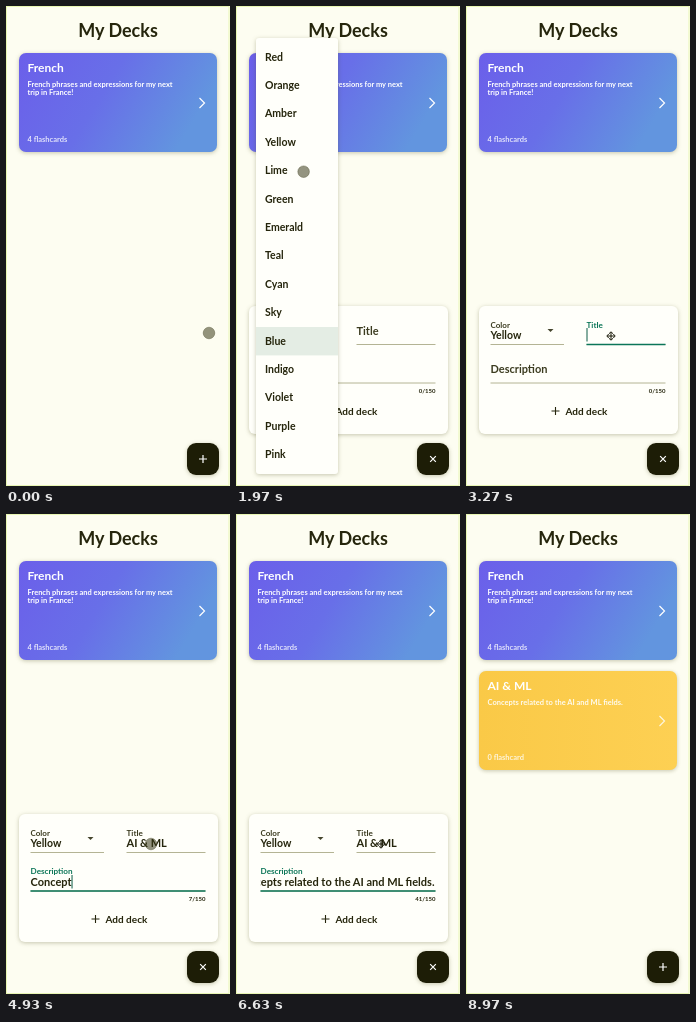
Write an HTML page that moves like this. It is 224x480 px and loops after 9010 ms.

```html
<!DOCTYPE html>
<html lang="en">
<head>
<meta charset="utf-8">
<title>My Decks</title>
<style>
  html, body { margin: 0; width: 100%; height: 100%; overflow: hidden; background: #fdfdf1; }
  svg { display: block; width: 224px; height: 480px; }
  text { font: 700 11px Lato, "Open Sans", sans-serif; fill: #25250c; white-space: pre; }
  .heading { font-size: 18px; }
  .name { font-size: 12px; }
  .card text { fill: #fff; }
  .card .small { font-size: 7.5px; }
  .label { fill: #3c3c20; }
  .tiny { font-size: 6px; }
  .option { font-size: 10.5px; }
  .line { stroke: #b4b494; stroke-width: 1; }
  .thin { fill: none; stroke: #25250c; stroke-width: 1.1; }
  .green { fill: #0c7658; }
  .focus { stroke: #0c7658; stroke-width: 1.3; }
  .shadow { filter: drop-shadow(0 1px 2px rgba(70, 70, 20, .3)); }
</style>
</head>
<body>
<svg viewBox="0 0 224 480">
  <defs>
    <linearGradient id="blue" x2="1" y2=".3">
      <stop stop-color="#6b5fea"/><stop offset=".5" stop-color="#686fe8"/><stop offset="1" stop-color="#6295df"/>
    </linearGradient>
    <linearGradient id="yellow"><stop stop-color="#fac946"/><stop offset="1" stop-color="#fdd052"/></linearGradient>
    <clipPath id="inputClip"><rect x="24.5" y="358" width="175" height="18"/></clipPath>
  </defs>
  <rect width="224" height="480" fill="#fdfdf1"/>
  <rect x=".5" y=".5" width="222.5" height="479" fill="none" stroke="#e9f6b4"/>
  <text class="heading" x="112" y="31" text-anchor="middle">My Decks</text>

  <g class="card">
    <rect class="shadow" x="13" y="47" width="198" height="99" rx="7" fill="url(#blue)"/>
    <text class="name" x="21.5" y="66">French</text>
    <text class="small" x="21.5" y="80.5">French phrases and expressions for my next</text>
    <text class="small" x="21.5" y="88.5">trip in France!</text>
    <text class="small" x="21.5" y="136" opacity=".8">4 flashcards</text>
    <path d="M193.5 92l5 5-5 5" fill="none" stroke="#fff" stroke-width="1.2"/>
  </g>
  <g class="card" id="newCard">
    <rect class="shadow" x="13" y="157" width="198" height="99" rx="7" fill="url(#yellow)"/>
    <text class="name" x="21.5" y="176">AI &amp; ML</text>
    <text class="small" x="21.5" y="190.5" opacity=".9">Concepts related to the AI and ML fields.</text>
    <text class="small" x="21.5" y="246" opacity=".8">0 flashcard</text>
    <path d="M193.5 202l5 5-5 5" fill="none" stroke="#fff" stroke-width="1.2" opacity=".8"/>
  </g>

  <g id="panel">
    <rect class="shadow" x="13" y="300" width="199" height="128" rx="6" fill="#fffffa"/>
    <text class="label" x="24.5" y="322" style="font-size:8px">Color</text>
    <text id="color" x="24.5" y="333" style="font-size:10.5px"></text>
    <path d="M81.5 323h6l-3 3z" fill="#44442c"/>
    <path class="line" d="M24.5 338.5h73.5M120.5 338.5h79M24.5 377h175"/>
    <text id="titleLabel">Title</text>
    <text id="title" x="120.5" y="333"></text>
    <text id="descLabel">Description</text>
    <g clip-path="url(#inputClip)"><text id="desc" y="371.5"></text></g>
    <path id="titleFocus" class="focus"/>
    <path id="descFocus" class="focus"/>
    <path id="caret" stroke="#0c5c46"/>
    <text id="count" class="tiny" x="199.5" y="387" text-anchor="end"></text>
    <path class="thin" d="M85.5 405h8m-4-4v8"/>
    <text x="99.5" y="408.5" style="font-size:10px">Add deck</text>
  </g>

  <rect class="shadow" x="181" y="437" width="32" height="32" rx="9" fill="#1d1d06"/>
  <path id="plus" d="M-4 0h8M0-4v8" stroke="#fff" stroke-width="1.2"/>

  <g id="menu">
    <rect class="shadow" x="20" y="32" width="82" height="436" rx="3" fill="#fffffa"/>
    <rect x="20" y="321" width="82" height="28.4" fill="#e4ede4"/>
  </g>

  <circle id="dot" r="5.8" fill="#32320f" fill-opacity=".52" stroke="#48482a" stroke-opacity=".4"/>
  <path id="cross" d="M-3.5 0h7M0-3.5v7M-2-2.3l2-1.9 2 1.9M-2 2.3l2 1.9 2-1.9M-2.3-2l-1.9 2 1.9 2M2.3-2l1.9 2-1.9 2"
        fill="none" stroke="#161605" stroke-width="1"/>
</svg>
<script>
const LOOP = 9010;
const TITLE = 'AI & ML';
const DESCRIPTION = 'Concepts related to the AI and ML fields.';
const OPTIONS = 'Red Orange Amber Yellow Lime Green Emerald Teal Cyan Sky Blue Indigo Violet Purple Pink'.split(' ');
// Pointer stops: time, x, y
const STOPS = [
  [0, 203, 327], [400, 197, 453], [740, 197, 453], [1240, 82, 330], [1700, 82, 330],
  [2060, 65, 136], [2550, 65, 136], [2900, 145, 330], [6970, 145, 330], [7330, 125, 407]
];

const $ = id => document.getElementById(id);
const set = (id, attrs) => { for (const key in attrs) $(id).setAttribute(key, attrs[key]); };
const clamp = x => Math.min(1, Math.max(0, x));
const mix = (a, b, k) => a + (b - a) * k;
const ease = (t, from, to) => { const k = clamp((t - from) / (to - from)); return k * k * (3 - 2 * k); };
const typed = (text, t, start, step) => text.slice(0, Math.max(0, Math.floor((t - start) / step)));

OPTIONS.forEach((name, i) => {
  const label = document.createElementNS('http://www.w3.org/2000/svg', 'text');
  label.textContent = name;
  label.setAttribute('class', 'option');
  label.setAttribute('x', 29);
  label.setAttribute('y', 54.5 + i * 28.4);
  $('menu').append(label);
});

function grow(id, opacity, x, y) {
  const scale = mix(.8, 1, opacity);
  set(id, { opacity, transform: `translate(${x} ${y}) scale(${scale}) translate(${-x} ${-y})` });
}

function floatLabel(id, x, y, top, k, focused) {
  set(id, {
    transform: `translate(${x} ${mix(y, top, k)}) scale(${mix(1, .74, k)})`,
    class: focused ? 'green' : 'label'
  });
}

function underline(id, middle, half, y, k) {
  set(id, { d: `M${middle - half * k} ${y}h${2 * half * k}`, opacity: k > 0 ? 1 : 0 });
}

function pointer(t) {
  let i = 0;
  while (i < STOPS.length - 2 && t >= STOPS[i + 1][0]) i++;
  const [t0, x0, y0] = STOPS[i], [t1, x1, y1] = STOPS[i + 1];
  const k = ease(t, t0, t1);
  const transform = `translate(${mix(x0, x1, k)} ${mix(y0, y1, k)})`;
  const isCross = (t >= 3000 && t < 4400) || (t >= 6400 && t < 6970);
  const visible = t < 8100;
  set('dot', { transform, opacity: visible && !isCross ? 1 : 0 });
  set('cross', { transform, opacity: visible && isCross ? 1 : 0 });
}

function form(t) {
  const inTitle = t >= 2980 && t < 4400, inDesc = t >= 4400;
  $('color').textContent = t < 2120 ? 'Blue' : 'Yellow';
  $('title').textContent = typed(TITLE, t, 3500, 95);
  const text = $('desc').textContent = typed(DESCRIPTION, t, 4690, 34);
  $('count').textContent = text.length + '/150';

  floatLabel('titleLabel', 120.5, 328.5, 322, ease(t, 2980, 3180), inTitle);
  floatLabel('descLabel', 24.5, 367, 360, ease(t, 4400, 4600), inDesc);
  underline('titleFocus', 160, 39.5, 338.5, inTitle ? ease(t, 2980, 3180) : 0);
  underline('descFocus', 112, 87.5, 377, ease(t, 4400, 4600));

  const width = text ? $('desc').getComputedTextLength() : 0;
  set('desc', { x: 24.5 + Math.min(0, 174 - width) });
  const titleWidth = $('title').textContent ? $('title').getComputedTextLength() : 0;
  const caretX = inTitle ? 121 + titleWidth : 25 + Math.min(174, width);
  const caretOn = (inTitle || inDesc) && !(t >= 6600 && t < 7100);
  set('caret', { d: `M${caretX} ${inTitle ? 322 : 361}v13.5`, opacity: caretOn ? 1 : 0 });
}

function draw(t) {
  const open = ease(t, 570, 820) * (1 - ease(t, 7870, 8180));
  form(t);
  grow('panel', open, 197, 428);
  grow('menu', ease(t, 1470, 1720) * (1 - ease(t, 2110, 2320)), 61, 335);
  set('plus', { transform: `translate(197 453) rotate(${45 * open})` });
  set('newCard', { opacity: ease(t, 8780, 8980) });
  pointer(t);
}

const start = performance.now();
function tick() {
  draw((performance.now() - start) % LOOP);
  requestAnimationFrame(tick);
}
tick();
</script>
</body>
</html>
```
